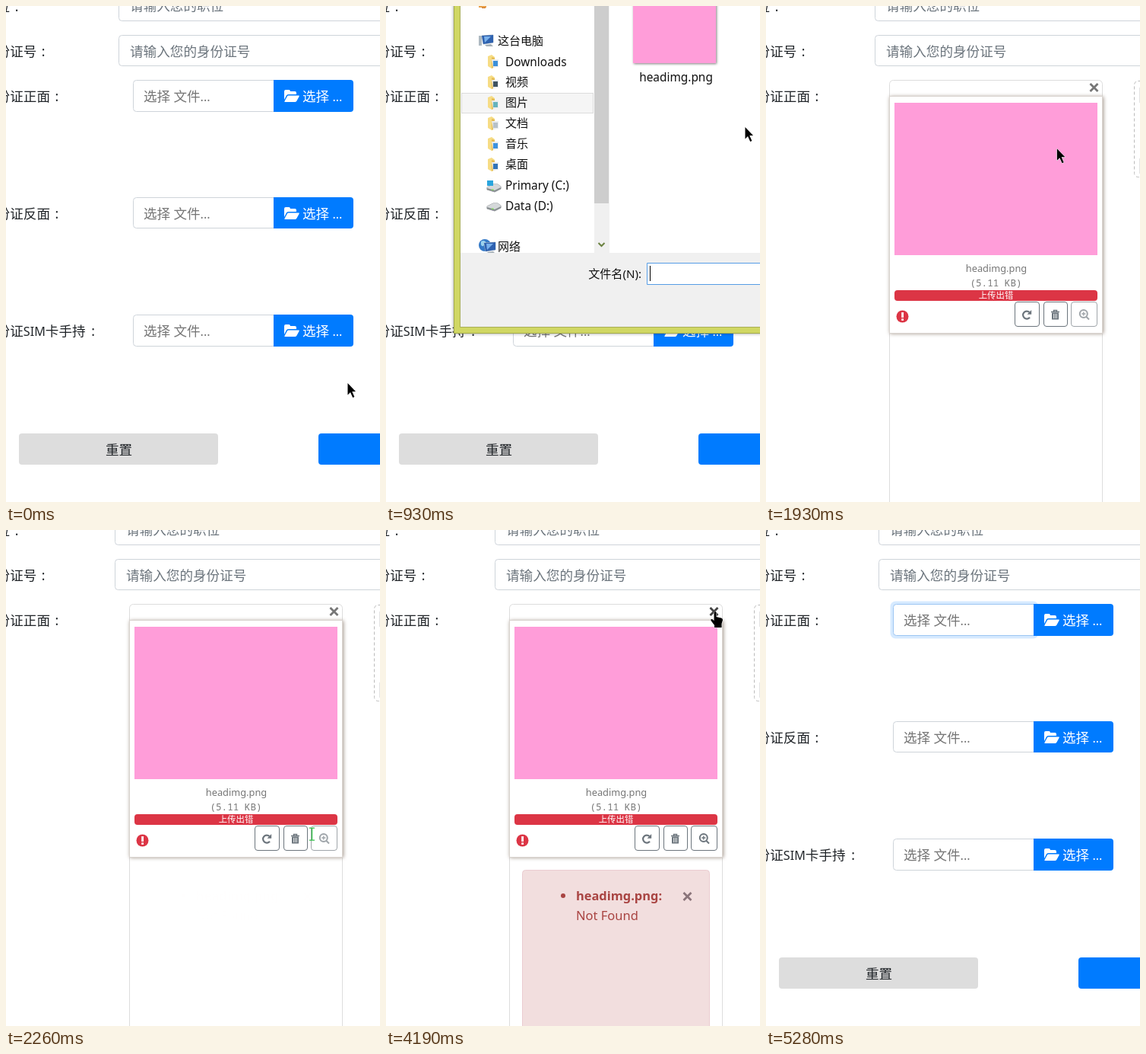
Recreate the animation shown at these times as an HTML page with a canvas. Size 492 by 651 pixels, loop 5.33 s.

```html
<!DOCTYPE html>
<html lang="zh-CN">
<head>
<meta charset="utf-8">
<style>
html, body { margin: 0; width: 100%; height: 100%; overflow: hidden; background: #fff; }
canvas { display: block; width: 492px; height: 651px; }
</style>
</head>
<body>
<canvas id="stage" width="492" height="651"></canvas>
<script>
const c = document.getElementById('stage').getContext('2d');
const LOOP = 5330;
const SANS = '"Noto Sans", "Noto Sans CJK SC", sans-serif';
const MONO = '"Noto Sans Mono", monospace';
const INK = '#212529', GREY = '#6c757d', BLUE = '#007bff', DARK_BLUE = '#0069d9';
const RED = '#dc3545', PINK = '#ff9dd9', LINE = '#ced4da', FOCUS = '#80bdff';

// Times of the main states
const OPEN = 650, PICK = 1400, SHUT = 1660, LOAD = 1690, CARD = 1900, CLEAR = 4240, BLUR = 5210;

// Pointer path: time, x, y
const path = [
  [0, 449, 494], [60, 449, 488], [180, 441, 420], [320, 425, 285], [440, 402, 160], [540, 392, 120],
  [640, 390, 120], [700, 385, 140], [780, 400, 146], [930, 472, 158], [1060, 470, 150], [1300, 374, 60],
  [1560, 374, 66], [1700, 374, 84], [1770, 374, 84], [1900, 380, 160], [2100, 395, 330], [2260, 402, 399],
  [2340, 403, 410], [2600, 410, 537], [2750, 414, 520], [2920, 420, 430], [3040, 420, 340],
  [3110, 422, 303], [3220, 427, 198], [3430, 434, 146], [3540, 478, 158], [3740, 433, 107],
  [4190, 433, 107], [4310, 438, 110], [4400, 437, 140], [4560, 428, 350], [4710, 424, 560],
  [4770, 427, 610], [4830, 430, 670], [5330, 430, 670]
];

const clamp = v => Math.max(0, Math.min(1, v));
const between = (t, a, b) => t >= a && t < b;

function pointer(t) {
  let i = 1;
  while (i < path.length - 1 && path[i][0] <= t) i++;
  const [t0, x0, y0] = path[i - 1], [t1, x1, y1] = path[i];
  const k = clamp((t - t0) / (t1 - t0));
  return { x: x0 + (x1 - x0) * k, y: y0 + (y1 - y0) * k };
}

function mix(a, b, k) {
  const part = (s, i) => parseInt(s.slice(i, i + 2), 16);
  return `rgb(${[1, 3, 5].map(i => Math.round(part(a, i) + (part(b, i) - part(a, i)) * k)).join()})`;
}

function text(s, x, cy, size, color, o = {}) {
  c.font = `${o.bold ? 'bold ' : ''}${size}px ${o.mono ? MONO : SANS}`;
  c.textAlign = o.align || 'left';
  c.fillStyle = color;
  c.fillText(s, x, cy + size * 0.36);
}

// Chinese with Latin runs set a little smaller, on one baseline
function mixed(s, x, cy, size, color) {
  c.textAlign = 'left';
  c.fillStyle = color;
  for (const run of s.match(/[ -~]+|[^ -~]+/g)) {
    c.font = `${/[ -~]/.test(run) ? size * 0.92 : size}px ${SANS}`;
    c.fillText(run, x, cy + size * 0.36);
    x += c.measureText(run).width;
  }
}

function rect(x, y, w, h, color) {
  c.fillStyle = color;
  c.fillRect(x, y, w, h);
}

function box(x, y, w, h, r, fill, stroke) {
  const e = stroke ? 0.5 : 0;
  c.beginPath();
  c.roundRect(x + e, y + e, w - 2 * e, h - 2 * e, r);
  if (fill) { c.fillStyle = fill; c.fill(); }
  if (stroke) { c.strokeStyle = stroke; c.lineWidth = 1; c.stroke(); }
}

function shape(d, x, y, fill, stroke, width = 1) {
  const p = new Path2D(d);
  c.save();
  c.translate(x, y);
  if (stroke) { c.strokeStyle = stroke; c.lineWidth = width; c.stroke(p); }
  if (fill) { c.fillStyle = fill; c.fill(p); }
  c.restore();
}

function dot(x, y, r, color) {
  c.beginPath();
  c.arc(x, y, r, 0, 7);
  c.fillStyle = color;
  c.fill();
}

const cross = (x, y, color) => shape('M-5 -5L5 5M5 -5L-5 5', x, y, null, color, 2.8);

function label(s, y) {
  mixed(s, -30, y, 17.6, INK);
  text(':', -30 + (s.length + 0.5) * 17.6, y, 17.6, INK, { align: 'center' });
}

function folder(x, y) {
  shape('M0 13V2Q0 0 2 0H6Q8 0 8 2H14Q16 2 16 4V6H6Q4 6 3 7.3Z', x, y, '#fff');
  shape('M5.5 7.5H19Q20.4 7.5 19.6 8.7L16.5 14.5Q15.5 16 14 16H1Q-.2 16 .6 14.8L4 8.6Q4.6 7.5 5.5 7.5Z', x, y, '#fff');
}

// A focused field lies above its button, otherwise the button covers its edge
function picker(y, h, p, { glow = 0, top = false, from = LINE, dark = false, file } = {}) {
  const over = dark || (p && p.x > 352 && p.x < 457 && p.y > y && p.y < y + h);
  const button = () => box(352, y, 105, h, [0, 4, 4, 0], over ? DARK_BLUE : BLUE);
  if (top) button();
  if (glow) box(163.5, y - 3.5, 195, h + 7, 7, `rgba(0,123,255,${0.25 * glow})`);
  box(167, y, 188, h, [4, 0, 0, 4], '#fff', mix(from, FOCUS, glow));
  if (!top) button();
  if (file) {
    shape('M0 0H9V6H16V18H0ZM10.3 0L16 5H10.3Z', 178, y + 12, '#444b54');
    text(file, 201, y + 21, 16.1, '#343a40');
  } else {
    mixed('选择 文件...', 181, y + 21.5, 17.6, '#757575');
  }
  folder(366, y + 13);
  mixed('选择 ...', 390, y + 21.5, 17.6, '#fff');
  return over;
}

function fields(dx) {
  label('职位', 1);
  box(148 + dx, -22, 420, 42, 4, '#fff', LINE);
  text('请输入您的职位', 163 + dx, 0, 17.6, GREY);
  label('身份证号', 60);
  box(148 + dx, 38, 420, 41, 4, '#fff', LINE);
  text('请输入您的身份证号', 163 + dx, 59.5, 17.6, GREY);
  label('身份证正面', 119);
}

function spinner(x, y, turn) {
  c.save();
  c.translate(x, y);
  c.rotate(turn);
  for (let i = 0; i < 2; i++) {
    shape('M-6 -1A6 6 0 0 1 4 -5', 0, 0, null, '#34574a', 2.4);
    shape('M7.5 -8V-1.5H1Z', 0, 0, '#34574a');
    c.rotate(Math.PI);
  }
  c.restore();
}

// Returns true when the pointer is above something clickable
function form(t, p) {
  fields(0);
  let over = false;
  const live = t < OPEN || t > CLEAR ? p : null;
  if (between(t, LOAD, CARD)) {
    box(167, 97, 290, 48, 5, '#fff', '#ddd');
    mixed('加载第 1 文件 共 1 ...', 232, 121, 17.6, '#28a745');
    spinner(312, 121, Math.PI / 2 + (t - 1760) / 320);
    cross(445.5, 107, '#8f9389');
    picker(152, 41, null, { file: 'headimg.png', glow: clamp((t - LOAD) / 150), top: true, dark: true });
  } else if (t >= CLEAR) {
    const fresh = t < BLUR;
    const glow = fresh ? clamp((t - 4310) / 150) : 1 - clamp((t - BLUR) / 200);
    const plain = t < 4350;
    over = picker(97, 42, plain ? null : live, { glow, top: fresh, from: fresh ? RED : LINE }) || plain;
  } else {
    over = picker(97, 42, live);
  }
  label('身份证反面', 273);
  over = picker(251, 41, live) || over;
  mixed('身份证SIM卡手持', -30, 427, 17.6, INK);
  text(':', 114.5, 427, 17.6, INK, { align: 'center' });
  over = picker(405, 42, live) || over;
  box(17, 561, 262, 41, 4, '#ddd');
  text('重置', 148.5, 583, 17.6, INK, { align: 'center' });
  const send = live && live.x > 411 && live.y > 561 && live.y < 602;
  box(411, 561, 200, 41, 4, send ? DARK_BLUE : BLUE);
  return over || send;
}

function navFolder(y, tint) {
  shape('M0 1L5 -1L9 2V15L5 17L0 14Z', 134, y - 8, '#f6dc85');
  shape('M5 2L9 3V15L5 17Z', 134, y - 8, '#e6bd55');
  shape('M5 5H14V15L7 16Z', 134, y - 8, '#e9edf0');
  shape('M7 7H13V14H7Z', 134, y - 8, tint);
}

function drive(y) {
  shape('M0 4L8 0H14L18 3V6L10 10L0 7Z', 133, y - 5, '#d5d8da', '#8b9094');
  shape('M0 5L10 8L18 4V6L10 10L0 7Z', 133, y - 5, '#858b8f');
  rect(139, y + 1.5, 2.5, 1.5, '#7fd957');
}

function monitor(x, y) {
  shape('M0 1L15 0V10L2 12Z', x, y, '#2f62b0', '#b4c1ca');
  shape('M3 2H12L4 10Z', x, y, '#79b1ec');
  shape('M4 13L12 12L15 15H6Z', x, y, '#a5afb6');
}

function dialog(t, p) {
  c.save();
  c.globalAlpha = clamp((t - OPEN) / 150) * clamp((SHUT - t) / 80);
  c.shadowColor = 'rgba(0,0,0,.4)';
  c.shadowBlur = 4;
  rect(89, -20, 440, 450, '#d0d763');
  c.shadowColor = 'transparent';
  c.strokeStyle = '#a3aa4c';
  c.lineWidth = 1;
  c.strokeRect(89.5, -20, 440, 449.5);
  rect(97, -10, 400, 432, '#a9af58');
  rect(98, -10, 400, 431, '#f0f0f0');
  rect(98, 0, 394, 324, '#fff');
  rect(274, 0, 20, 324, '#f0f0f0');
  rect(274, 0, 19, 259, '#cdcdcd');
  shape('M-4 -2L0 2L4 -2', 283.5, 313, null, '#6b8241', 2);

  rect(122, 0, 10, 2, '#e9a04a');
  rect(126, 2, 5, 1, '#c9772b');
  rect(99, 114, 174, 27, '#dcdcdc');
  rect(100, 115, 172, 25, '#f5f5f5');
  rect(122, 39, 4, 13, '#aeb9c1');
  monitor(126, 38);
  text('这台电脑', 147, 46, 15, '#111');
  const rows = [['Downloads', '#3c8fd8'], ['视频', '#3f5361'], ['图片', '#66b3bd'], ['文档', '#b7c1c9'], ['音乐', '#3d92df'], ['桌面', '#3274b8']];
  rows.forEach(([name, tint], i) => {
    const y = 73 + i * 27;
    navFolder(y, tint);
    text(name, 157, y, i ? 15 : 15.4, '#111');
  });
  drive(239);
  rect(133, 229, 8, 7, '#2ba5dd');
  text('Primary (C:)', 157, 235, 15.4, '#111');
  drive(264);
  text('Data (D:)', 157, 262, 15.4, '#111');
  dot(130, 314, 8, '#3479c7');
  shape('M-5 -5Q0 -8 2 -3L-2 1Q-6 2 -5 -5Z', 130, 314, '#9bd2ee');
  monitor(129, 310);
  rect(120, 324, 26, 4, '#f0f0f0');
  text('网络', 147, 316, 15, '#111');

  const picked = t >= PICK;
  if (picked || (p.x < 445 && p.x > 315 && p.y < 108)) {
    box(316, -10, 130, 119, 0, picked ? '#cbe8f6' : '#e5f3fb', picked ? '#26a0da' : '#70c0e7');
  }
  c.shadowColor = 'rgba(0,0,0,.5)';
  c.shadowBlur = 3;
  c.shadowOffsetX = c.shadowOffsetY = 1;
  rect(325, -10, 109, 85, PINK);
  c.shadowColor = 'transparent';
  text('headimg.png', 381.5, 93, 15.4, '#111', { align: 'center' });

  text('文件名(N):', 336, 352, 15.1, '#111', { align: 'right' });
  box(343, 337, 180, 29, 0, '#fff', '#569de5');
  if (picked) text('headimg.png', 348, 352, 15.4, '#111');
  else if ((t - 700) % 1060 < 530) rect(347, 341, 1, 20, '#000');
  c.restore();
}

function card(t) {
  fields(-5);
  box(162, 97, 281, 620, 5, '#fff', '#ddd');
  c.setLineDash([4, 3]);
  box(484, 98, 100, 127, 5, null, '#bbb');
  c.setLineDash([]);
  rect(491, 107, 1, 20, '#e3e3e3');
  rect(491, 200, 1, 20, '#e3e3e3');
  cross(431.5, 107, between(t, 3680, CLEAR) ? '#444' : '#777');

  c.save();
  c.shadowColor = '#a2958a';
  c.shadowBlur = 5;
  c.shadowOffsetX = c.shadowOffsetY = 1;
  rect(162, 118, 281, 311, '#fff');
  c.restore();
  c.strokeStyle = '#d8d3ce';
  c.lineWidth = 1;
  c.strokeRect(162.5, 118.5, 280, 311);
  rect(169, 127, 267, 200, PINK);
  text('headimg.png', 303, 344, 12.8, '#777', { align: 'center' });
  text('(5.11 KB)', 302.5, 363, 12.6, '#777', { align: 'center', mono: true });
  box(169, 373, 267, 14, 4, RED);
  text('上传出错', 302.5, 380, 11.4, '#fff', { align: 'center' });
  dot(179.5, 407.5, 8, RED);
  rect(178.2, 402, 2.8, 7, '#fff');
  rect(178.2, 410.3, 2.8, 2.6, '#fff');

  box(327, 388, 33, 33, 3.5, '#fff', GREY);
  shape('M4 3.2A5 5 0 1 1 3.5 -3.6', 343, 405.5, null, GREY, 2.2);
  shape('M6.2 -6.5V-.8H.5Z', 343, 405.5, GREY);
  box(365, 388, 32, 33, 3.5, '#fff', GREY);
  shape('M-5.5 -3.5H5.5M-2 -4V-5.5H2V-4', 380.5, 405, null, GREY, 1.5);
  shape('M-4.5 -2.5H4.5V6.5H-4.5Z', 380.5, 405, GREY);
  shape('M-2 -1V5M0 -1V5M2 -1V5', 380.5, 405, null, '#fff', 0.8);
  c.save();
  c.globalAlpha = t < 2330 ? 0.65 : 1;
  box(401, 388, 35, 33, 3.5, '#fff', GREY);
  shape('M4.3 -1A5 5 0 1 1 -5.7 -1A5 5 0 1 1 4.3 -1M3 3L6.5 6.5', 418.5, 405, null, GREY, 2);
  shape('M-3.2 -1H1.8M-.7 -3.5V1.5', 418.5, 405, null, GREY, 1.4);
  c.restore();

  const fade = clamp((t - 2230) / 800);
  if (!fade) return;
  c.save();
  c.globalAlpha = 0.5 - Math.cos(fade * Math.PI) / 2;
  box(179, 446, 247, 260, 4, '#f2dede', '#ebccd1');
  dot(233, 480, 3, '#a94442');
  text('headimg.png:', 250, 480, 16.4, '#a94442', { bold: true });
  text('Not Found', 250, 506, 16.5, '#a94442');
  cross(396.5, 481, '#8a747a');
  c.restore();
}

function cursor(kind, { x, y }) {
  if (kind === 'hand') {
    shape('M-1.5 1Q0 -1 1.5 1V7L8 8.5Q10 9 10 11L8.5 16V21H-1V18L-5.5 12Q-6.5 9.5 -4 10L-1.5 12Z', x, y, '#000', '#fff', 1);
  } else if (kind === 'beam') {
    shape('M-3.5 -8H-1Q0 -8 0 -7Q0 -8 1 -8H3.5M0 -7V7M-3.5 8H-1Q0 8 0 7Q0 8 1 8H3.5', x + 0.5, y, null, '#35c04a', 1.4);
  } else {
    shape('M0.5 1V16.5L4 13L7.2 20L9.4 19L6.3 12H11Z', x, y, '#000', '#fff', 1);
  }
}

function draw(t) {
  const p = pointer(t);
  let kind = 'arrow';
  rect(0, 0, 492, 651, '#fff');
  if (between(t, CARD, CLEAR)) {
    card(t);
    if (between(t, 2170, 2330)) kind = 'beam';
    if (t > 3700) kind = 'hand';
  } else {
    if (form(t, p)) kind = 'hand';
    if (between(t, OPEN, SHUT)) dialog(t, p);
  }
  cursor(kind, p);
}

const start = performance.now();
function tick() {
  draw((performance.now() - start) % LOOP);
  requestAnimationFrame(tick);
}
tick();
</script>
</body>
</html>
```
